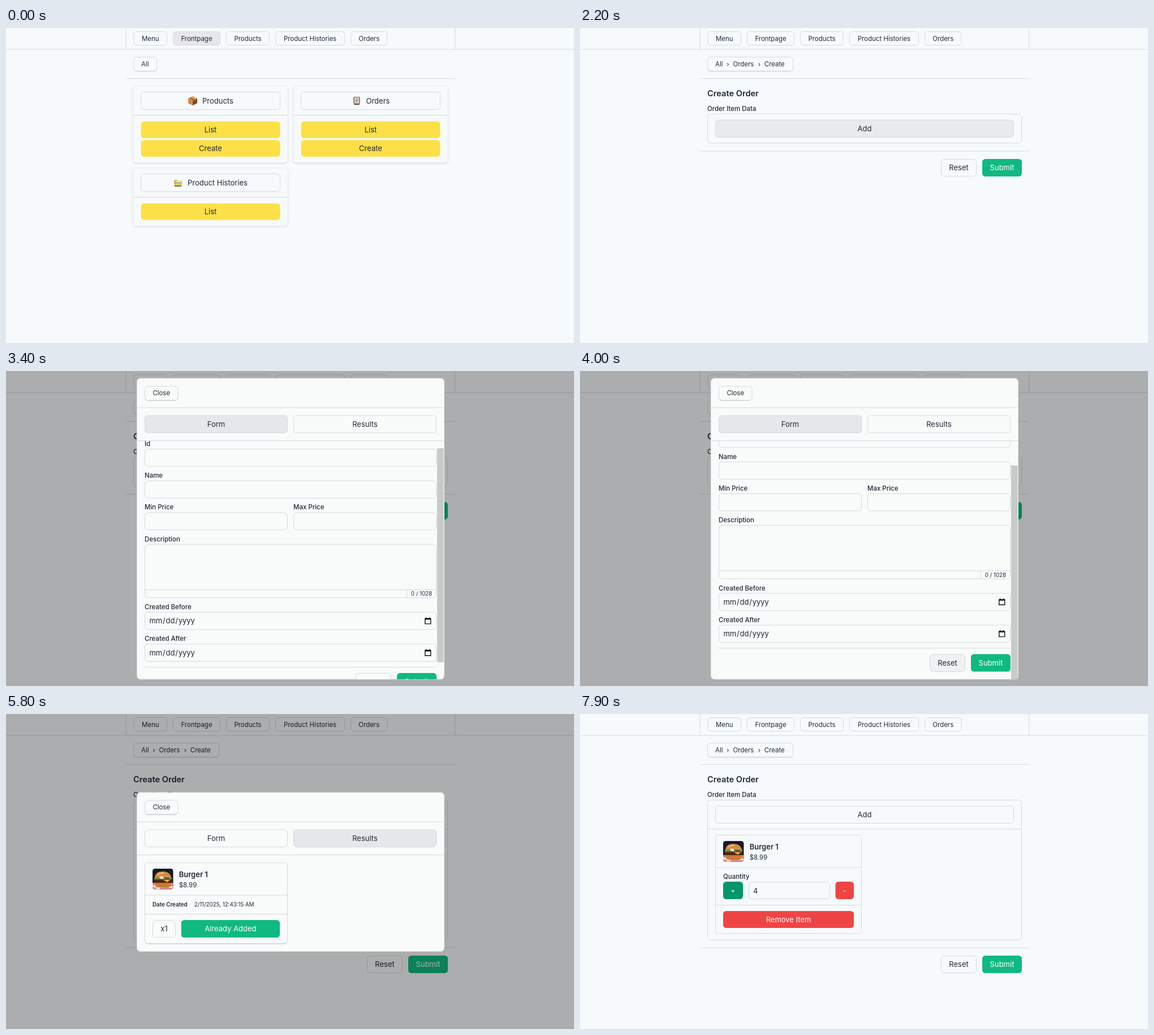
These frames come from a looping animation (1004 by 558 pixels, 8000 ms). An HTML page:

```html
<!DOCTYPE html>
<html lang="en">
<head>
<meta charset="utf-8">
<title>Create order</title>
<style>
html, body { margin: 0; width: 100%; height: 100%; overflow: hidden; background: #f7fafc; }
svg { display: block; font-family: Inter, sans-serif; }
</style>
</head>
<body>
<svg id="stage" width="1004" height="558" viewBox="0 0 1004 558">
  <defs>
    <filter id="soft" x="-10%" y="-20%" width="120%" height="150%">
      <feDropShadow dx="0" dy="1" stdDeviation="1.8" flood-color="#0f172a" flood-opacity=".15"/>
    </filter>
    <filter id="low" x="-10%" y="-20%" width="120%" height="150%">
      <feDropShadow dx="0" dy="1" stdDeviation=".7" flood-color="#0f172a" flood-opacity=".15"/>
    </filter>
    <clipPath id="body"><rect x="232" y="124" width="542" height="422"/></clipPath>
    <clipPath id="thumb"><rect width="36.5" height="36.5" rx="4.5"/></clipPath>
  </defs>
  <g id="view"></g>
</svg>
<script>
const LOOP = 8000, STEP = 100;
const PAGE = '#f7fafc', SHEET = '#f9fafa', INK = '#1f2937', LINE = '#d5dade', GRAY = '#e5e7eb';
const YELLOW = '#fde047', YELLOW2 = '#facc15', YELLOW3 = '#f2bf10';
const GREEN = '#10b981', GREEN2 = '#059669', RED = '#ef4444', RED2 = '#dc2626';
const SMALL = 11.45, BASE = 13, TINY = 9.75;
const view = document.getElementById('view');

function mix(a, b, p) {
  const ch = (c, i) => parseInt(c.substr(1 + 2 * i, 2), 16);
  return `rgb(${[0, 1, 2].map(i => Math.round(ch(a, i) + (ch(b, i) - ch(a, i)) * p))})`;
}

// Progress of a short transition, sampled at the step rate
function ramp(t, start, steps) {
  const k = Math.floor((t - start) / STEP);
  if (k < 0) return 0;
  if (k >= steps - 1) return 1;
  return steps === 2 ? 0.5 : [0.15, 0.5][k];
}

const at = (x, y, s) => `<g transform="translate(${x} ${y})">${s}</g>`;

function text(s, x, cy, size = BASE, { weight = 400, anchor = 'start', fill = INK } = {}) {
  return `<text x="${x}" y="${cy + size * 0.36}" font-size="${size}" font-weight="${weight}" text-anchor="${anchor}" fill="${fill}">${s}</text>`;
}

function box(x, y, x2, y2, { fill = PAGE, stroke = LINE, r = 5, filter } = {}) {
  const f = filter ? ` filter="url(#${filter})"` : '';
  return `<rect x="${x}" y="${y}" width="${x2 - x}" height="${y2 - y}" rx="${r}" fill="${fill}" stroke="${stroke}"${f}/>`;
}

const solid = (x, y, x2, y2, fill) => box(x, y, x2, y2, { fill, stroke: 'none', r: 5.5 });
const hline = (x, x2, y) => `<path d="M${x} ${y}H${x2}" stroke="${LINE}"/>`;

function button(label, x, y, x2, y2, opt = {}) {
  return box(x, y, x2, y2, opt) +
    text(label, (x + x2) / 2, (y + y2) / 2, opt.size, { anchor: 'middle' });
}

function filled(label, x, y, x2, y2, fill, ink = '#fff', size = BASE) {
  return solid(x, y, x2, y2, fill) +
    text(label, (x + x2) / 2, (y + y2) / 2, size, { anchor: 'middle', fill: ink });
}

const NAV = [['Menu', 226, 284.5], ['Frontpage', 295.5, 378.5], ['Products', 389.5, 465.5],
  ['Product Histories', 476.5, 598.5], ['Orders', 609.5, 674]];

function header(active) {
  return hline(0, 1004, 38) +
    `<path d="M212 0V38M794 0V38" stroke="${LINE}"/>` +
    NAV.map(([s, x, x2]) => button(s, x, 6.5, x2, 30.5, {
      size: SMALL, fill: s === 'Frontpage' ? mix(PAGE, '#e6e6ec', active) : PAGE
    })).join('') + hline(212, 794, 89.5);
}

function crumbs(parts, end) {
  return box(225.5, 51.5, end, 76, { filter: 'low' }) +
    parts.map(([s, x]) => text(s, x, 64, SMALL)).join('');
}

const ICONS = {
  parcel: `<path d="M0 4L8 0L16 4V12L8 16L0 12Z" fill="#a8713c"/><path d="M0 4L8 8V16L0 12Z" fill="#c98d4c"/>
    <path d="M8 8L16 4V12L8 16Z" fill="#7d4a2a"/><path d="M0 4L8 0L16 4L8 8Z" fill="#dba55f"/>
    <path d="M4 2L12 6V9L9.5 10V7.2L2 3.2Z" fill="#8f5f35"/>`,
  bill: `<rect x="2.5" y="1" width="11" height="12" rx="1" fill="#75605f"/><rect x="4" y="2" width="8" height="12" fill="#e9dfd6"/>
    <path d="M5.5 4.5H10.5M5.5 6.5H10.5M5.5 8.5H10.5M5.5 10.5H9" stroke="#8a7775"/><rect x="3" y="12.8" width="10" height="2.2" rx="1" fill="#5b4a4c"/>`,
  folder: `<path d="M1 3H6L7.5 4.5H14V14H1Z" fill="#c98f2b"/><rect x="3" y="4.5" width="10" height="5" fill="#e8f0e4"/>
    <path d="M3 7H13V9H3Z" fill="#57a58a"/><path d="M1 14L3 8H15.5L13.5 14Z" fill="#f2c846"/><path d="M1.5 13H13.5V14.5H1.5Z" fill="#5a4a3a"/>`
};

function card(x, y, title, icon, ix, tx, actions) {
  const h = 102.5 + 33 * (actions.length - 1);
  let s = box(0, 0, 273, h, { filter: 'soft', stroke: '#eceff2' }) +
    box(13.5, 10.5, 259.5, 41.5) + at(ix, 18, ICONS[icon]) + text(title, tx, 26, BASE) +
    hline(0, 273, 51.5);
  actions.forEach(([label, fill], i) => {
    s += filled(label, 13.5, 62.5 + 33 * i, 259.5, 92 + 33 * i, fill, INK);
  });
  return at(x, y, s);
}

function frontpage(t) {
  const hover = ramp(t, 300, 3), press = ramp(t, 800, 3);
  const create = press ? mix(YELLOW2, YELLOW3, press) : mix(YELLOW, YELLOW2, hover);
  return header(1) + crumbs([['All', 239]], 267) +
    card(225, 103, 'Products', 'parcel', 97, 122, [['List', YELLOW], ['Create', YELLOW]]) +
    card(508, 103, 'Orders', 'bill', 104, 128.5, [['List', YELLOW], ['Create', create]]) +
    card(225, 248.2, 'Product Histories', 'folder', 71.5, 96, [['List', YELLOW]]);
}

function status(t) {
  const a = t < 1800 ? ramp(t, 800, 3) : 1 - ramp(t, 1800, 2);
  if (!a) return '';
  return `<g opacity="${a}"><path d="M0 541.5H132Q135.5 541.5 135.5 545V558H0Z" fill="#e8ebee" stroke="#cfd4d9"/>
    <text x="4" y="553" font-size="8.8" font-family="Noto Sans, sans-serif" fill="#5f6368">localhost:3000/order/create</text></g>`;
}

const photo = `<g clip-path="url(#thumb)"><rect width="37" height="37" fill="#171a2a"/>
  <path d="M0 25H37V37H0Z" fill="#d98a86"/><path d="M0 29H8V33H0ZM6 33H13V37H6ZM29 31H37V34H29Z" fill="#f3d9d4"/>
  <path d="M4 16Q5 5 18 5Q31 5 33 16Z" fill="#d98b3e"/><path d="M9 11Q13 7 20 7.5" stroke="#f0bd78" stroke-width="2" fill="none"/>
  <path d="M3 16Q10 13 18 16T34 15V19H3Z" fill="#6f9a3c"/><path d="M12 14L18 13L20 18L14 18Z" fill="#f1ead2"/>
  <rect x="4" y="18" width="29" height="3" fill="#b8321f"/><rect x="3" y="20" width="31" height="5" rx="2" fill="#4a2416"/>
  <path d="M19 20H31L26 24Z" fill="#f0b62f"/><path d="M4 25H33Q33 33 27 33H10Q4 33 4 25Z" fill="#cc7a30"/></g>`;

function product(x, y) {
  return at(x, y, photo) + text('Burger 1', x + 46.7, y + 10, BASE, { weight: 600 }) +
    text('$8.99', x + 46.7, y + 28.5, SMALL);
}

function orderItem(t) {
  const count = 1 + [7400, 7700, 7900].filter(s => t >= s).length;
  return hline(225.5, 780.5, 204) + box(239.5, 214.5, 497.5, 389) + product(253, 225) +
    hline(239.5, 497.5, 272) + text('Quantity', 253, 288.3, SMALL, { weight: 500 }) +
    filled('+', 253, 297, 288, 328, t >= 7000 ? GREEN2 : GREEN, '#fff', SMALL) +
    box(298.5, 297.5, 441.5, 327.5) + text(count, 306, 313) +
    filled('-', 451.5, 297, 484, 328, RED, '#fff', SMALL) + hline(239.5, 497.5, 338.5) +
    filled('Remove Item', 253, 349, 484, 379, t >= 6100 && t < 6700 ? RED2 : RED);
}

function orderPage(t) {
  const added = t >= 5300, drop = added ? 196 : 0;
  const onAdd = t >= 2200 && t < 6100;
  return header(1 - ramp(t, 1400, 3)) +
    crumbs([['All', 239], ['›', 259.3], ['Orders', 270.4], ['›', 314.8], ['Create', 325.8]], 376.5) +
    text('Create Order', 225, 115.5, 14.6, { weight: 600 }) +
    text('Order Item Data', 225, 142.5, SMALL, { weight: 500 }) +
    box(225.5, 152.5, 780.5, 204 + drop) +
    button('Add', 239.5, 163, 766.5, 193.5, { fill: onAdd ? '#e9eaee' : PAGE }) +
    (added ? orderItem(t) : '') +
    at(0, drop, hline(212, 794, 218) + button('Reset', 638.5, 232.5, 700.5, 262.5) +
      filled('Submit', 711, 232, 781, 263, GREEN));
}

function field(label, x, x2, y) {
  return text(label, x, y, SMALL, { weight: 500 }) +
    box(x + .5, y + 9.5, x2 - .5, y + 40, { fill: SHEET });
}

function dateField(label, y) {
  const parts = ['mm', '/', 'dd', '/', 'yyyy'].map(s => `<tspan dx=".8">${s}</tspan>`).join('');
  return field(label, 245, 761, y) + text(parts, 252.6, y + 24.7) +
    at(740, y + 18.5, `<path d="M.8 2H10.7V11.4H.8Z" fill="none" stroke="#111" stroke-width="1.4"/>
      <path d="M.8 3H10.7M2.8 0V2M8.7 0V2" stroke="#111" stroke-width="1.8"/>`);
}

function searchForm(t) {
  const scroll = t < 3400 ? 0 : [0.3, 0.8, 1][Math.min(2, Math.floor((t - 3400) / STEP))];
  const out = ramp(t, 4000, 2);
  const reset = t < 3600 ? 0 : 1 - out;
  const form = field('Id', 245, 761, 143.2) + field('Name', 245, 761, 199.5) +
    field('Min Price', 245, 498, 255.7) + field('Max Price', 508, 761, 255.7) +
    text('Description', 245, 312.2, SMALL, { weight: 500 }) +
    box(245.5, 321.5, 760.5, 416, { fill: SHEET }) + hline(245.5, 760.5, 402) +
    `<path d="M708.5 402V416" stroke="${LINE}"/>` + text('0 / 1028', 715.8, 409, TINY) +
    dateField('Created Before', 432.4) + dateField('Created After', 488.7) + hline(245, 761, 539) +
    button('Reset', 618.5, 550, 680.5, 580.5, { fill: mix(SHEET, GRAY, reset) }) +
    filled('Submit', 691, 549.5, 761, 580.5, mix(GREEN, GREEN2, t < 4100 ? 0 : 1));
  return `<g clip-path="url(#body)">${at(0, -48 * scroll, form)}
    <rect x="762" y="${124 + 43.3 * scroll}" width="11.5" height="379" fill="#c8c9c9"/></g>`;
}

function results(t) {
  const added = t >= 5300;
  let s = box(245.5, 137.5, 497.5, added ? 280.5 : 279.5, { fill: SHEET, filter: 'low' }) +
    product(259, 148) + hline(245.5, 497.5, 195) +
    text('Date Created', 259, 211.5, TINY, { weight: 600 }) +
    text('2/11/2025, 12:43:15 AM', 332.7, 211.5, TINY) + hline(245.5, 497.5, 228.8);
  if (added) {
    const fill = t >= 5800 ? GREEN : mix(YELLOW2, GREEN2, ramp(t, 5300, 2));
    s += button('x1', 259.5, 239.5, 299.5, 269.5, { fill: SHEET }) +
      filled('Already Added', 309.7, 239, 484, 270, fill);
  } else {
    s += filled('Add Item', 259, 239.3, 484, 269, t >= 5000 ? YELLOW2 : YELLOW, INK);
  }
  return s;
}

function modal(t) {
  const found = t >= 4300, added = t >= 5300;
  const top = found ? (added ? 126 : 126.5) : 0;
  const bottom = found ? (added ? 294.5 : 293) : 546;
  const swap = ramp(t, 4300, 3);
  const tab = p => ({ fill: mix(SHEET, GRAY, p) });
  return '<rect width="1004" height="558" fill="#000" opacity=".31"/>' + at(0, top,
    box(231.5, 13, 774.5, bottom, { fill: SHEET, stroke: '#dfe2e5', r: 6 }) +
    button('Close', 245.5, 27, 304, 51.5, { fill: SHEET, size: SMALL, filter: 'low' }) +
    hline(232, 774, 65) +
    button('Form', 245.5, 79, 497.5, 109.5, tab(1 - swap)) +
    button('Results', 508.5, 79, 760.5, 109.5, tab(swap)) +
    hline(232, 774, 123.5) + (found ? results(t) : searchForm(t)));
}

function render(t) {
  view.innerHTML = `<rect width="1004" height="558" fill="${PAGE}"/>` +
    (t < 1400 ? frontpage(t) : orderPage(t)) +
    (t >= 2700 && t < 6100 ? modal(t) : '') + status(t);
}

let start = null, last = -1;
function tick(now) {
  if (start === null) start = now;
  const t = Math.floor(((now - start) % LOOP) / STEP) * STEP;
  if (t !== last) render(last = t);
  requestAnimationFrame(tick);
}
render(0);
requestAnimationFrame(tick);
</script>
</body>
</html>
```
